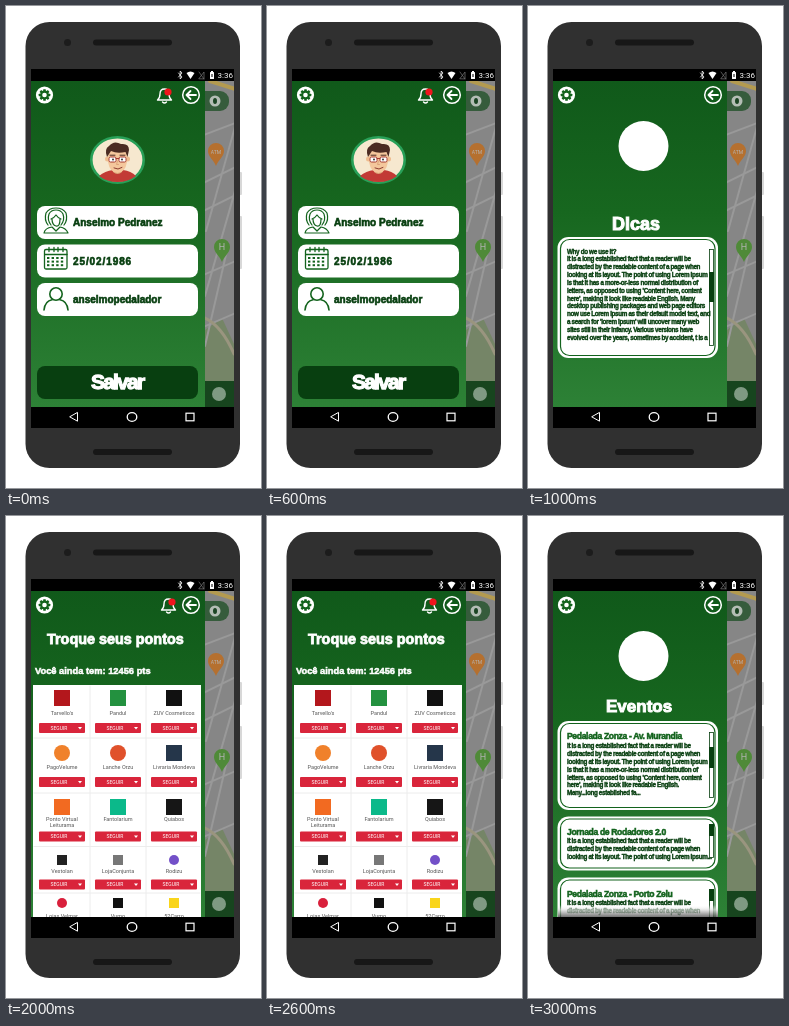
An HTML page for the animation above (4000 ms loop, 255 by 482 pixels).

```html
<!DOCTYPE html>
<html lang="pt">
<head>
<meta charset="utf-8">
<style>
  html, body { margin: 0; width: 100%; height: 100%; overflow: hidden; background: #fff; }
  svg { display: block; width: 255px; height: 482px; }
  text { font-family: "Liberation Sans", Arial, sans-serif; font-weight: bold; }
  .thin { font-family: Roboto, sans-serif; font-weight: 400; }
  .line { fill: none; stroke-linecap: round; stroke-linejoin: round; }
</style>
</head>
<body>
<svg id="stage" viewBox="0 0 255 482"></svg>
<script>
const GREEN = '#13631d', DEEP = '#083f10', WHITE = '#fff';

const rect = (x, y, w, h, fill, r = 0, more = '') =>
  `<rect x="${x}" y="${y}" width="${w}" height="${h}" rx="${r}" fill="${fill}" ${more}/>`;
const circle = (x, y, r, fill, more = '') =>
  `<circle cx="${x}" cy="${y}" r="${r}" fill="${fill}" ${more}/>`;
const line = (d, color, width = 1) =>
  `<path class="line" d="${d}" stroke="${color}" stroke-width="${width}"/>`;
const shape = (d, fill) => `<path d="${d}" fill="${fill}"/>`;
const heavy = (x, y, size, str, fill = WHITE, gap = 0) =>
  `<text x="${x}" y="${y}" font-size="${size}" letter-spacing="${gap}" fill="${fill}"
    stroke="${fill}" stroke-width="${size * .06}">${str}</text>`;
const thin = (x, y, size, str, fill) =>
  `<text class="thin" x="${x}" y="${y}" font-size="${size}" text-anchor="middle" fill="${fill}">${str}</text>`;
const lines = (x, y, list) =>
  list.map((s, i) => heavy(x, y + i * 7.85, 6.3, s, DEEP, -.34)).join('');

function pin(x, y, color, label) {
  return shape(`M${x} ${y + 14}C${x - 2} ${y + 8} ${x - 8} ${y + 5} ${x - 8} ${y - 1}
    a8 8 0 0 1 16 0C${x + 8} ${y + 5} ${x + 2} ${y + 8} ${x} ${y + 14}z`, color) +
    thin(x, y + 1.5, label.length > 1 ? 5 : 9, label, '#b5b5b5');
}

function map() {
  const roads = 'M195 130L232 116M195 178L232 160M195 206L232 188M195 270L232 254M195 322L232 306' +
    'M232 110L200 225M229 185L199 290M222 240L199 340';
  return `<g clip-path="url(#strip)">` + rect(199, 75, 29, 326, '#868686') +
    shape('M199 324L216 312L228 338V375H199z', '#758567') +
    line(roads, '#999', 2) +
    line('M204 75L232 84', '#b39a50', 4) + line('M199 312Q216 320 228 348', '#9a957f', 3) + '</g>' +
    rect(190, 85, 33, 20, '#365c3c', 9) +
    circle(209, 95, 5.5, '#b4bdb5') + `<ellipse cx="209" cy="95" rx="2" ry="3" fill="#1c4524"/>` +
    pin(210, 146, '#b5702f', 'ATM') + pin(216, 242, '#4f8a38', 'H') +
    rect(199, 375, 29, 26, '#17451e') + circle(213, 388, 7, '#7f9a83');
}

function phone() {
  return rect(232, 166, 4, 23, '#d8d8d8', 1) + rect(232, 210, 4, 53, '#d8d8d8', 1) +
    rect(19.5, 16, 214.5, 446, '#303030', 24) + circle(61.5, 36.5, 3.5, '#1c1c1c') +
    rect(87, 33.5, 79, 6, '#171717', 3) + rect(87, 443, 79, 6, '#171717', 3) +
    rect(25, 63, 203, 359, '#000') +
    line('M172.5 67L176 71L174.2 73V65L176 67L172.5 71', WHITE, .8) +
    shape('M180.5 67Q184.5 64 188.5 67L184.5 73z', WHITE) +
    line('M193 72.5L198 66V72.5zM193 66L198 73', '#777', .7) +
    rect(204, 66, 4, 7, WHITE, .5) + rect(205, 65, 2, 2, WHITE) + rect(205.5, 68, 1, 3, '#000') +
    `<text class="thin" x="211.5" y="72.4" font-size="8" fill="#fff">3:36</text>` +
    line('M71.5 406.8V415.2L64 411z', WHITE) +
    `<ellipse class="line" cx="126" cy="411" rx="4.8" ry="4.3" stroke="#fff" stroke-width="1.3"/>` +
    rect(180, 407.2, 8, 7.6, 'none', 0, 'stroke="#fff" stroke-width="1.2"') +
    map() + rect(25, 75, 174, 326, 'url(#panel)');
}

function controls() {
  let teeth = '';
  for (let a = 0; a < 360; a += 45)
    teeth += rect(37.2, 83.2, 2.6, 4, GREEN, .5, `transform="rotate(${a} 38.5 89)"`);
  return circle(38.5, 89, 8.6, WHITE) + teeth + circle(38.5, 89, 4.4, GREEN) + circle(38.5, 89, 2.3, WHITE) +
    circle(185, 89, 8.3, 'none', 'stroke="#fff" stroke-width="1.5"') +
    line('M190 89H180.5M184.5 85L180.5 89L184.5 93', WHITE, 1.8);
}

const bell = x => `<g transform="translate(${x} 89)">` +
  line('M-7 5H7Q4.5 3 4.5 -1Q4.5 -6 0 -6Q-4.5 -6 -4.5 -1Q-4.5 3 -7 5zM-2 7Q0 9 2 7', WHITE, 1.4) +
  circle(3.5, -3, 3.6, '#f0151d') + '</g>';

function avatar() {
  return `<ellipse cx="111.5" cy="154" rx="26.2" ry="22.8" fill="#f6e8cf" stroke="#28a058" stroke-width="2.6"/>` +
    shape('M93 170Q99 165 107 164H117Q125 165 130 170Q122 176 111.5 176T93 170z', '#c23a35') +
    shape('M107 160H116V166Q111.5 170 107 166z', '#dba579') +
    circle(101.5, 153, 2.5, '#efbd90') + circle(121.5, 153, 2.5, '#efbd90') +
    shape('M102 145H121V156Q119 167 111.5 167T102 156z', '#f4c79c') +
    shape('M101 151Q98 143 103 140Q108 134 115 138Q123 137 123 144L121.5 151L119.5 146Q111 148 105 145z', '#4b2b22') +
    line('M104 149.2H109M114 149.2H119', '#4b2b22', 1) +
    rect(103, 151, 7, 5, '#fff', 1.5, 'stroke="#a3392f"') + rect(113, 151, 7, 5, '#fff', 1.5, 'stroke="#a3392f"') +
    line('M110 152.5H113', '#a3392f') + circle(107, 153.5, .9, '#222') + circle(116, 153.5, .9, '#222') +
    line('M111.5 155L110.5 158.5H112.5', '#d79c72', .8) + line('M108 162Q112 164.5 116 161.5', '#8c3d30', 1);
}

function profile() {
  const cal = [0, 1, 2, 3, 4, 5, 6, 7, 8, 9, 10, 11]
    .map(i => rect(41 + i % 4 * 4.6, 251 + (i >> 2) * 3.6, 2.4, 2, GREEN)).join('');
  const fields = [[200, 'Anselmo Pedranez', 0], [238.5, '25/02/1986', .9], [277, 'anselmopedalador', 0]];
  return controls() + bell(158.5) + avatar() +
    fields.map(([y, s, gap]) => rect(31, y, 161, 33, WHITE, 8) + heavy(67, y + 20.3, 10, s, DEEP, gap)).join('') +
    line('M45 219Q41 214 43 208Q45 204 50 204T57 208Q59 214 55 219M45 213Q48 212 50 209Q52 212 55 213' +
      'M46 213Q46 219 50 220T54 213M38 227Q39 222 46 221L50 225L54 221Q60 222 62 227zM42 219Q38 214 40 207Q43 202 50 202T60 207Q62 214 58 219', GREEN, 1.2) +
    rect(38.5, 243.5, 22.5, 19.5, 'none', 1.5, `stroke="${GREEN}" stroke-width="1.3"`) +
    line('M39 248.5H61M43 241.5V245.5M48 241.5V245.5M52 241.5V245.5M57 241.5V245.5', GREEN, 1.3) + cal +
    circle(50, 288, 6.2, 'none', `stroke="${GREEN}" stroke-width="1.6"`) +
    line('M38 304Q39 295 46 293.8M54 293.8Q61 295 62 304', GREEN, 1.6) +
    rect(31, 360, 161, 33, DEEP, 8) + heavy(85, 383, 21, 'Salvar', WHITE, -1.8);
}

const emblem = circle(115.5, 140, 25, WHITE);
const card = (y, h) => rect(29.5, y, 160.5, h, WHITE, 11) +
  rect(32.5, y + 2.5, 154.5, h - 5, 'none', 9, `stroke="${GREEN}" stroke-width="1.2"`);
const bar = (y, h, top, size) =>
  rect(181.5, y, 4, h, WHITE, 0, `stroke="${DEEP}" stroke-width=".8"`) + rect(181, top, 5, size, DEEP);

function tips() {
  return controls() + emblem + heavy(84, 223.5, 18, 'Dicas') +
    card(231, 121) + bar(243.5, 96, 266, 30) +
    lines(39, 247.5, [
      'Why do we use it?',
      'It is a long established fact that a reader will be',
      'distracted by the readable content of a page when',
      'looking at its layout. The point of using Lorem Ipsum',
      'is that it has a more-or-less normal distribution of',
      "letters, as opposed to using 'Content here, content",
      "here', making it look like readable English. Many",
      'desktop publishing packages and web page editors',
      'now use Lorem Ipsum as their default model text, and',
      "a search for 'lorem ipsum' will uncover many web",
      'sites still in their infancy. Various versions have',
      'evolved over the years, sometimes by accident, t is a']);
}

// name, colour, round mark
const SHOPS = [
  ["Tarvello's", '#b3171c'], ['Pandul', '#23913f'], ['ZUV Cosmeticos', '#111'],
  ['PagoVelume', '#f0812b', 1], ['Lanche Orzu', '#e0512b', 1], ['Livraria Mondeva', '#25364a'],
  ['Ponto Virtual|Leiturama', '#f26a21'], ['Fantolarium', '#0bb98a'], ['Quiabos', '#161616'],
  ['Vestolan', '#222'], ['LojaConjunta', '#777'], ['Rodizu', '#7350c8', 1],
  ['Lojas Velmar', '#d9203c', 1], ['Vumo', '#111'], ['52Carro', '#f9d51c']];
// logo, label and button heights
const ROWS = [[182, 199, 207], [237, 253, 261], [291, 305, 315.5], [344, 356.5, 363.5], [387, 402, 410]];

function shops() {
  const cells = SHOPS.map(([name, color, round], i) => {
    const x = 56 + i % 3 * 56, [mark, label, button] = ROWS[i / 3 | 0], r = i > 8 ? 5 : 8;
    return (round ? circle(x, mark, r, color) : rect(x - r, mark - r, 2 * r, 2 * r, color)) +
      name.split('|').map((s, n) => thin(x, label + n * 6.2, 5.5, s, '#555')).join('') +
      rect(x - 23, button, 46, 10, '#d9253b', 1) + thin(x - 3, button + 6.8, 5, 'SEGUIR', WHITE) +
      shape(`M${x + 16} ${button + 4}h4l-2 2.5z`, WHITE);
  }).join('');
  return controls() + bell(162.5) + heavy(41, 128, 14.4, 'Troque seus pontos') +
    heavy(29, 158.3, 9.3, 'Você ainda tem: 12456 pts') +
    `<g clip-path="url(#screen)">` + rect(27, 169, 168, 232, WHITE) +
    line('M28 222H194M28 277H194M28 330.5H194M28 377H194M84 170V401M140 170V401', '#ececec', 1) + cells + '</g>';
}

function events() {
  const lead = [
    'It is a long established fact that a reader will be',
    'distracted by the readable content of a page when'];
  return controls() + emblem + heavy(78, 196, 17, 'Eventos') +
    `<g clip-path="url(#screen)">` +
    card(205, 89) + bar(216.5, 65, 231, 21) + heavy(39, 223.3, 8.6, 'Pedalada Zonza - Av. Murandia', GREEN, -.36) +
    lines(39, 232.2, [...lead,
      'looking at its layout. The point of using Lorem Ipsum',
      'is that it has a more-or-less normal distribution of',
      "letters, as opposed to using 'Content here, content",
      "here', making it look like readable English.",
      'Many...long established fa...']) +
    card(300.5, 54) + bar(308.5, 33, 308, 12) + heavy(39, 318.5, 8.6, 'Jornada de Rodadores 2.0', GREEN, -.36) +
    lines(39, 327, [...lead, 'looking at its layout. The point of using Lorem Ipsum...']) +
    card(361.5, 54) + bar(373.5, 40, 373, 12) + heavy(39, 380.8, 8.6, 'Pedalada Zonza - Porto Zelu', GREEN, -.36) +
    lines(39, 389, lead) + rect(30, 389, 160, 12, 'url(#fade)') + '</g>';
}

const screens = [profile, tips, shops, events];
stage.innerHTML = `<defs>
  <linearGradient id="panel" x2="0" y2="1"><stop stop-color="#10591a"/><stop offset=".4" stop-color="#17671f"/><stop offset="1" stop-color="#2d8136"/></linearGradient>
  <linearGradient id="fade" x2="0" y2="1"><stop stop-color="#fff" stop-opacity="0"/><stop offset=".4" stop-color="#ddd" stop-opacity=".7"/><stop offset="1" stop-color="#444" stop-opacity=".75"/></linearGradient>
  <clipPath id="screen"><rect x="25" y="75" width="174" height="326"/></clipPath>
  <clipPath id="strip"><rect x="199" y="75" width="29" height="326"/></clipPath>
</defs>` + phone() + screens.map(draw => `<g class="view">${draw()}</g>`).join('');

const views = document.querySelectorAll('.view');
function tick() {
  const now = Math.floor(performance.now() / 1000) % views.length;
  views.forEach((v, i) => v.style.display = i === now ? '' : 'none');
  requestAnimationFrame(tick);
}
tick();
</script>
</body>
</html>
```
